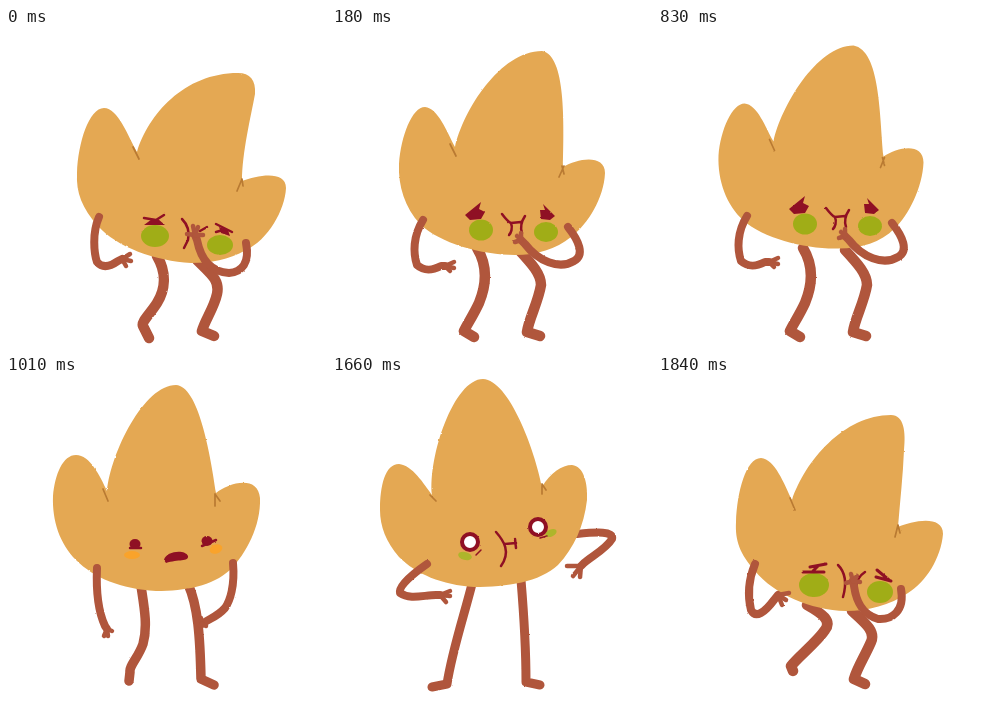
An HTML page for the animation above (2020 ms loop, 320 px wide and 320 px high).

```html
<!DOCTYPE html>
<html lang="en">
<head>
<meta charset="utf-8">
<title>Queasy leaf</title>
<style>
  html, body { margin: 0; width: 100%; height: 100%; overflow: hidden; background: #fff; }
  svg { display: block; width: 100vw; height: 100vh; }
  path { fill: none; stroke-linecap: round; stroke-linejoin: round; }
</style>
</head>
<body>
<svg viewBox="0 0 320 320">
  <filter id="rough" x="0" y="0" width="320" height="320" filterUnits="userSpaceOnUse" color-interpolation-filters="sRGB">
    <feTurbulence type="fractalNoise" baseFrequency=".35" numOctaves="1" seed="4"/>
    <feDisplacementMap in="SourceGraphic" scale="2" xChannelSelector="R" yChannelSelector="G"/>
  </filter>
  <g id="stage" filter="url(#rough)"></g>
</svg>
<script>
const SKIN = '#e4a853', LIMB = '#b0563c', INK = '#8f1024', CREASE = '#b97a32';
const GREEN = '#a0ad17', ORANGE = '#f9a32b', LIME = '#aeb52b';

const line = (d, color, width) => `<path d="${d}" stroke="${color}" stroke-width="${width}"/>`;
const blob = (d, color) => `<path d="${d}" style="fill:${color}"/>`;
const oval = (color, x, y, rx, ry, turn = 0) =>
  `<ellipse cx="${x}" cy="${y}" rx="${rx}" ry="${ry}" fill="${color}" transform="rotate(${turn} ${x} ${y})"/>`;
const ringEye = (x, y) => `<circle cx="${x}" cy="${y}" r="8" fill="#fff" stroke="${INK}" stroke-width="4"/>`;
const ink = (d, width = 2.5) => line(d, INK, width);

// An arm ends in fingers that fan out from the palm.
function arm(d, palm, tips, width = 8) {
  return line(d + ' L' + palm, LIMB, width) +
    tips.split(' ').map(tip => line(`M${palm} L${tip}`, LIMB, 4.5)).join('');
}

const sick = {
  body: 'M62,130 C64,104 76,78 88,78 C101,79 109,102 117,116 C124,82 160,20 197,20 C224,25 223,90 227,131 C242,121 267,117 267,137 C266,162 252,190 238,203 C224,217 205,223 182,223 C150,224 107,213 87,195 C70,180 61,155 62,130Z',
  crease: 'M113,114 L118,125 M228,132 L224,142 M226,132 L228,140',
  legs: 'M145,220 C156,238 154,258 147,275 C141,288 134,298 132,303 L142,309 M187,222 C200,236 209,246 209,257 C206,275 197,290 195,304 L208,308',
  face: oval(GREEN, 148, 198, 12, 10.5) + oval(GREEN, 213, 200, 12, 10) +
    blob('M132,183 L148,170 L146,177 L152,180 L148,187 L137,188Z M210,172 L222,184 L217,188 L208,187 L207,178 L212,178Z', INK) +
    ink('M169,182 C172,186 175,190 178,191 L188,190 M192,184 C188,190 187,195 189,201 M178,191 C180,196 178,201 176,203'),
  arms: arm('M90,189 C80,205 80,222 84,234 C92,241 100,239 108,235', '112,235', '121,231 121,237 117,240') +
    arm('M235,196 C246,210 252,224 241,230 C226,239 205,230 192,213', '188,209', '182,211 184,205 188,202')
};

const gag = {
  body: 'M71,145 C72,115 83,80 98,80 C112,80 122,108 131,124 C142,87 178,45 232,45 C244,45 250,52 249,66 C245,88 236,125 236,153 C252,147 280,142 280,160 C279,182 262,212 240,222 C222,232 205,235 185,235 C150,233 110,219 92,198 C76,180 70,165 71,145Z',
  crease: 'M127,119 L133,131 M236,151 L231,163 M236,151 L237,158',
  legs: 'M151,228 C161,245 159,262 151,275 C144,286 135,294 137,298 L143,310 M191,232 C205,246 214,252 211,266 C208,280 199,292 196,303 L208,308',
  face: oval(GREEN, 149, 208, 14, 11) + oval(GREEN, 214, 217, 13, 10) +
    ink('M138,190 L150,192 L158,187 M210,196 L226,204 M210,204 L217,202') +
    blob('M146,191 L152,191 L159,197 L138,197Z M213,199 L222,202 L224,208 L215,205Z', INK) +
    ink('M176,191 C181,196 184,203 182,212 L178,220 M194,203 L201,199'),
  arms: arm('M93,189 C86,205 88,225 91,234 C97,241 105,238 112,233', '116,231', '124,226 125,233 120,238') +
    arm('M240,215 C244,235 236,244 223,245 C205,244 195,232 191,212', '189,207', '181,206 187,198 192,199 197,207')
};

const settle = {
  ...sick,
  body: 'M67,136 C69,108 80,79 93,79 C106,80 115,104 123,119 C131,83 168,23 210,23 C234,27 232,95 231,139 C246,130 273,126 273,145 C272,170 256,196 239,209 C224,221 205,227 183,227 C150,227 107,215 88,196 C73,180 66,158 67,136Z',
  crease: 'M118,116 L124,128 M232,138 L227,149 M230,138 L232,146',
  faceShift: '1 4', armShift: '1 3'
};

const swallow = { ...sick, bodyShift: '-1.5 -2.5', faceShift: '-1 -2', armShift: '-1 -1' };

const relax = {
  body: 'M47,120 C49,98 57,79 70,79 C84,79 94,100 101,115 C105,76 138,9 170,9 C192,10 204,75 210,117 C222,107 252,98 254,122 C255,150 240,178 224,194 C206,210 180,215 150,215 C115,213 88,202 70,184 C54,168 46,145 47,120Z',
  crease: 'M97,113 L102,125 M209,118 L209,130 M209,118 L214,125',
  legs: 'M135,210 C138,230 142,250 137,268 C132,282 123,290 124,296 L123,305 M182,208 C192,230 194,260 195,303 L208,309',
  legWidth: 9.5,
  face: oval(ORANGE, 126, 179, 8, 4) + oval(ORANGE, 210, 173, 6.5, 4.5, -20) +
    oval(INK, 129, 168, 5.5, 5) + oval(INK, 201, 165, 5.5, 5) +
    ink('M124,172 L135,172 M196,170 L210,164') +
    blob('M158,184 C160,175 179,173 182,180 C183,186 172,183 160,187Z', INK),
  arms: arm('M91,192 C90,215 92,235 99,250', '101,253', '98,260 102,260 106,255') +
    arm('M227,187 C229,210 224,225 219,232 C212,240 205,242 199,246', '196,248', '195,242 194,250 200,250')
};

const calm = {
  body: 'M40,122 C41,102 48,82 60,82 C73,82 86,104 93,115 C94,76 125,6 156,6 C184,8 200,72 204,111 C216,99 246,90 247,120 C247,145 235,172 217,190 C200,207 170,212 142,212 C108,211 82,199 64,181 C48,164 40,143 40,122Z',
  crease: 'M91,114 L97,124 M203,111 L204,125 M203,111 L207,119',
  legs: 'M130,208 C123,240 117,270 114,307 L100,311 M180,206 C187,235 193,270 194,304 L208,309',
  legWidth: 9,
  face: oval(ORANGE, 124, 179, 7, 3.5) + oval(ORANGE, 204, 168, 6, 3.5, -20) +
    oval(INK, 126, 168, 6, 6) + oval(INK, 196, 160, 5.5, 5.5) +
    ink('M153,183 C162,182 170,181 180,178', 3),
  behind: arm('M213,190 C216,215 218,235 217,251', '217,254', '213,261 217,261 222,259', 7),
  arms: arm('M91,190 C90,215 90,235 86,255', '86,258', '81,267 86,267 90,265', 7.5)
};

const startle = {
  body: 'M48,134 C48,110 53,88 67,88 C80,89 92,108 100,119 C96,80 122,3 151,3 C177,4 203,74 210,111 C218,97 230,89 240,89 C252,90 256,108 255,124 C252,150 242,172 226,189 C208,206 175,211 142,211 C110,209 84,198 67,181 C54,166 48,150 48,134Z',
  crease: 'M98,119 L104,125 M210,108 L210,118 M210,108 L214,114',
  legs: 'M140,208 C132,240 120,275 115,308 L100,311 M189,204 C192,240 194,275 194,306 L208,309',
  legWidth: 9,
  face: oval(LIME, 133, 180, 7, 4, 15) + oval(LIME, 219, 157, 6, 3.5, -25) +
    ringEye(138, 166) + ringEye(206, 151) +
    ink('M144,179 L149,174 M208,162 L215,160', 1.5) +
    ink('M164,156 C172,165 179,176 169,190 M173,168 L184,167 M183,163 L184,172'),
  behind: arm('M245,158 C265,156 282,155 280,163 C274,173 260,180 252,187', '249,190', '235,190 241,200 248,201'),
  arms: arm('M95,188 C82,197 66,210 68,217 C78,224 92,219 104,219', '108,219', '118,215 118,220 114,226')
};

const lurch = {
  body: 'M78,146 C79,116 88,82 103,82 C117,83 126,108 134,124 C147,85 186,39 233,39 C246,39 248,56 246,74 C245,100 242,125 240,151 C254,145 285,138 285,158 C283,182 268,206 250,217 C232,229 210,235 188,235 C152,234 116,218 97,195 C82,178 77,165 78,146Z',
  crease: 'M132,122 L137,134 M240,149 L237,161 M240,149 L242,157',
  legs: 'M149,229 C165,238 174,245 167,254 C159,266 141,280 133,290 L135,295 M194,235 C206,246 218,255 213,266 C207,280 199,292 196,303 L207,308',
  face: oval(GREEN, 156, 209, 15, 12) + oval(GREEN, 222, 216, 13, 11) +
    ink('M152,191 L168,188 M160,190 L155,195 M145,196 L166,196', 3) +
    ink('M219,194 L231,204 M218,201 L233,205', 3) +
    ink('M180,189 C187,196 189,207 185,221 M207,196 C201,200 199,204 198,210'),
  arms: arm('M97,188 C90,205 90,222 93,234 C98,243 107,236 116,224', '120,219', '131,217 128,224 124,229') +
    arm('M243,213 C247,235 234,244 220,243 C203,238 198,224 196,210', '195,205', '188,207 193,198 199,200 202,206')
};

const LOOP = 2020;
const timeline = [[0, gag], [180, settle], [650, sick], [830, swallow],
  [1010, relax], [1190, calm], [1660, startle], [1840, lurch]];

const shifted = (content, shift = '0 0') => `<g transform="translate(${shift})">${content}</g>`;

function draw(pose) {
  return line(pose.legs, LIMB, pose.legWidth || 10.5) + (pose.behind || '') +
    shifted(blob(pose.body, SKIN) + line(pose.crease, CREASE, 1.7), pose.bodyShift) +
    shifted(pose.face, pose.faceShift) + shifted(pose.arms, pose.armShift);
}

const stage = document.getElementById('stage');
let shown;

function update() {
  const time = performance.now() % LOOP;
  const pose = timeline.findLast(([start]) => start <= time)[1];
  if (pose !== shown) {
    stage.innerHTML = draw(pose);
    shown = pose;
  }
  requestAnimationFrame(update);
}
update();
</script>
</body>
</html>
```
